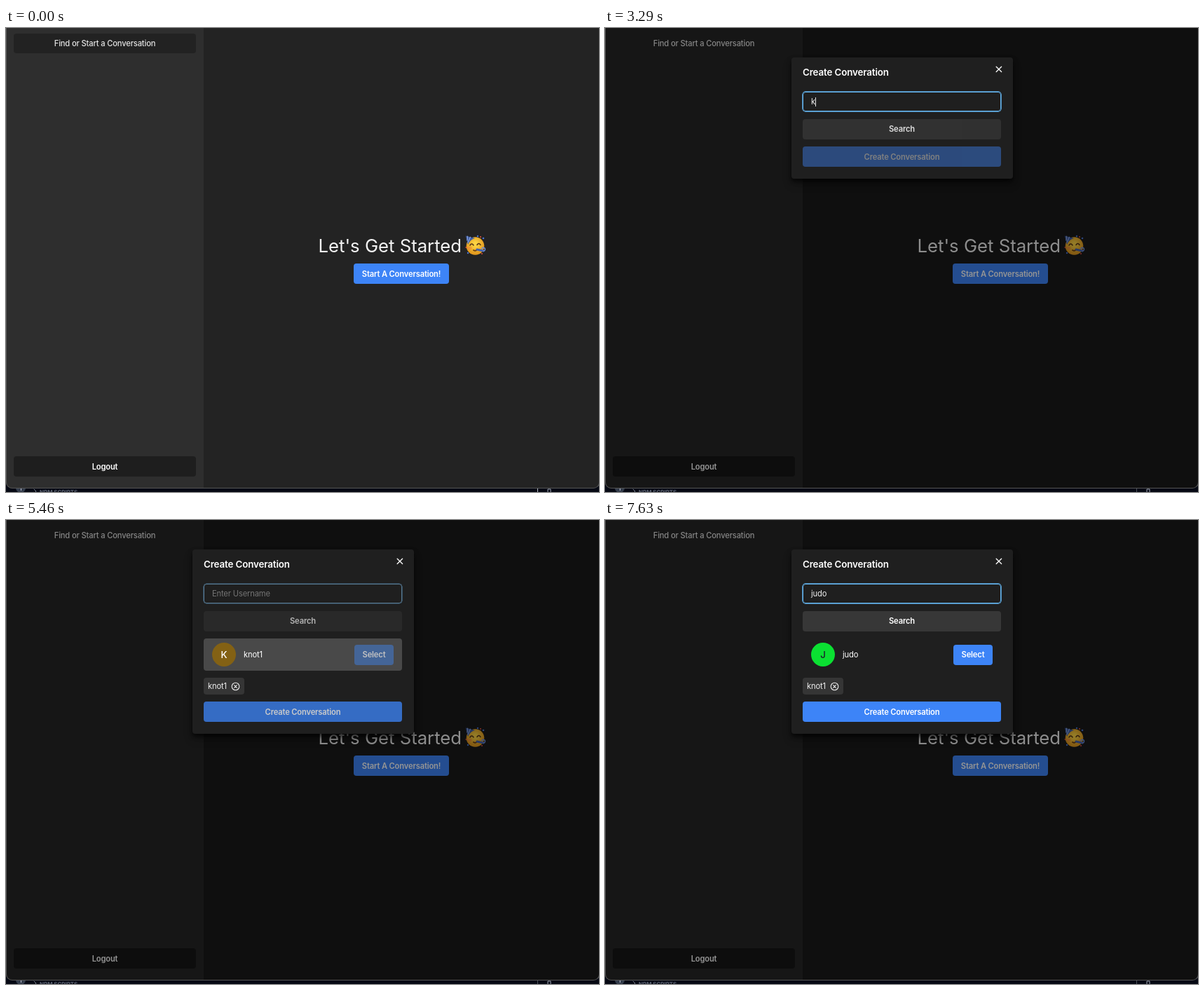
These frames come from a looping animation (846x662 px, 8 s). An HTML page:

```html
<!DOCTYPE html>
<html lang="en">
<head>
<meta charset="utf-8">
<title>Start a conversation</title>
<style>
  * { box-sizing: border-box; }
  html, body { margin: 0; width: 100%; height: 100%; overflow: hidden; background: #060914; }
  body { position: relative; font: 500 11.2px Inter, sans-serif; letter-spacing: -.17px;
         font-optical-sizing: none; color: #fff; white-space: pre; }
  .abs, .strip > * { position: absolute; }
  .button { display: flex; align-items: center; justify-content: center; height: 29px;
            border-radius: 4px; font-weight: 600; background: #3d84f7; }

  .strip { position: absolute; inset: 0; color: #596070; }
  .badge { left: 14px; top: 649px; width: 14px; height: 14px; border-radius: 50%; background: #343d4c;
           color: #ccd; font: 600 7px/18px Inter, sans-serif; text-align: center; }
  .scripts { left: 48px; top: 657px; font: 700 7.9px/10px Inter, sans-serif; letter-spacing: 0; }

  .window, .frame { position: absolute; inset: 0 0 5px; border-radius: 0 0 9px 9px; overflow: hidden; }
  .frame { right: -1px; border: solid #545454; border-width: 0 1px 1px; }
  #main { inset: 0; }
  #sidebar { left: 0; top: 0; bottom: 0; width: 282px; }
  #find { left: 11px; top: 8px; width: 260px; height: 28px; font-weight: 500; color: #e4e4e4; }
  #logout { left: 11px; top: 611px; width: 260px; }
  .heading { left: 445.5px; top: 296px; font: 400 25.7px/30px Inter, sans-serif; letter-spacing: 0; color: #f2f2f2; }
  .emoji { left: 654px; top: 294px; }
  #start { left: 496px; top: 336px; width: 136px; }
  #overlay { inset: 0; background: #000; }

  #modal { left: 266px; top: 42px; width: 315.5px; padding: 49px 16.5px 16.6px 16px; border-radius: 4px;
           background: #1f1f1f; display: flex; flex-direction: column; gap: 10.5px;
           box-shadow: 0 4px 6px #000a, 0 8px 14px #0003; }
  .title { left: 16px; top: 11px; font: 600 13.4px/21px Inter, sans-serif; letter-spacing: -.15px; }
  .close { left: 291px; top: 12px; }
  #input { height: 28.4px; padding-left: 11px; border: 1px solid; border-radius: 4px; display: flex;
           align-items: center; font-weight: 400; color: #eee; }
  #caret { width: 1px; height: 13px; margin-right: -1px; background: #e8e8e8; }
  #placeholder { color: #747474; }
  #row { height: 45.5px; padding: 0 12px; border-radius: 4px; display: flex; align-items: center;
         gap: 11px; font-weight: 400; }
  #avatar { width: 34px; height: 34px; border-radius: 50%; text-align: center;
            font: 500 13.2px/34px Inter, sans-serif; }
  #select { width: 56px; margin-left: auto; }
  #chip { align-self: flex-start; height: 23.5px; padding: 0 6px; border-radius: 4px; display: flex;
          align-items: center; gap: 6px; background: #353535; font-weight: 400; color: #eee; }
  svg { display: block; fill: none; stroke-linecap: round; }
</style>
</head>
<body>
<div class="strip">
  <div class="badge">1</div>
  <svg style="left:38px;top:657px" width="8" height="8" stroke="#737a8a"><path d="M2 1l3 3-3 3"/></svg>
  <div class="scripts">NPM SCRIPTS</div>
  <div id="divider" style="left:758px;top:656px;width:1px;height:6px;background:#b5bac6"></div>
  <svg style="left:771px;top:656px" width="8" height="8" stroke="#a0a6b4"><path d="M2 8V2H6V8"/></svg>
</div>

<div class="window">
  <div class="abs" id="main"></div>
  <div class="abs" id="sidebar"></div>
  <div class="abs button" id="find">Find or Start a Conversation</div>
  <div class="abs button" id="logout">Logout</div>
  <div class="abs heading">Let's Get Started</div>
  <svg class="abs emoji" width="31" height="31">
    <defs><radialGradient id="skin" cy=".4"><stop offset=".2" stop-color="#fcd443"/><stop offset="1" stop-color="#e39c20"/></radialGradient></defs>
    <circle cx="15.5" cy="17" r="12.8" fill="url(#skin)"/>
    <path d="M2 2.5L15 6Q8 8 5 15Z" fill="#3f5fa8"/>
    <path d="M4.5 3.2L4 9M8.5 4.3L5 12" stroke="#8fa7dc" stroke-width="1.2"/>
    <path d="M8 16q2.5-4 5 0M18 15.5q2.5-4 5 0" stroke="#5a3716" stroke-width="1.5"/>
    <ellipse cx="7.5" cy="20" rx="3" ry="2" fill="#f08a3c" opacity=".7"/>
    <path d="M13 23q3 2 5-1" stroke="#6b3f14" stroke-width="1.8"/>
    <path d="M18 22L27 24" stroke="#4664ad" stroke-width="3"/>
    <path d="M27 24a2.3 2.3 0 1 0-2-3" stroke="#6f8fd6" stroke-width="1.5"/>
    <g fill="#4b74d0"><circle cx="19" cy="3" r="1.2"/><circle cx="27" cy="6" r="1.3"/><circle cx="5" cy="27" r="1.2"/></g>
    <g fill="#d9503f"><circle cx="23" cy="4" r="1.1"/><circle cx="2.5" cy="19" r="1.1"/><circle cx="25" cy="28" r="1.1"/></g>
  </svg>
  <div class="abs button" id="start">Start A Conversation!</div>
  <div class="abs" id="overlay"></div>
  <div class="abs" id="modal">
    <div class="abs title">Create Converation</div>
    <svg class="abs close" width="10" height="10" stroke="#f4f4f4" stroke-width="1.4"><path d="M1.2 1.2l7.4 7.4M8.6 1.2L1.2 8.6"/></svg>
    <div id="input"><span id="value"></span><span id="caret"></span><span id="placeholder">Enter Username</span></div>
    <div class="button" id="search">Search</div>
    <div id="row"><div id="avatar"></div><span id="name"></span><div class="button" id="select">Select</div></div>
    <div id="chip">knot1<svg width="13" height="13" stroke="#eee" stroke-width="1.1"><circle cx="6.5" cy="6.5" r="5.3"/><path d="M4.7 4.7l3.6 3.6M8.3 4.7L4.7 8.3"/></svg></div>
    <div class="button" id="create">Create Conversation</div>
  </div>
</div>
<div class="frame"></div>

<script>
const LOOP = 8000;
const OPEN = 1320, RESULT = 3920, SELECTED = 5390, SEARCHING = 7280, RESULT_2 = 7420;
const BLUE = '#3d84f7', HOVER = '#4a5a6e';
const typed = [[0, ''], [3220, 'k'], [3360, 'kn'], [3570, 'kno'], [3710, 'knot'], [SELECTED, ''],
               [6580, 'j'], [6860, 'ju'], [6930, 'jud'], [7070, 'judo']];
const caretOn = [[2380, 2940], [3220, 4200], [4760, SELECTED], [5950, 6440], [6580, 7630]];

const el = Object.fromEntries([...document.querySelectorAll('[id]')].map(e => [e.id, e]));
const mix = (a, b, p) => `color-mix(in srgb, ${b} ${p * 100}%, ${a})`;
const show = (e, on, display = 'flex') => e.style.display = on ? display : 'none';

function draw(t) {
  // Eased 0..1 transition, and one that returns to 0.
  const ramp = (start, length = 200) => {
    const p = Math.min(1, Math.max(0, (t - start) / length));
    return 1 - (1 - p) ** 2;
  };
  const pulse = (on, off) => ramp(on) - ramp(off);
  const fade = (e, p) => e.style.opacity = .43 + .57 * p;
  const paint = (e, a, b, p) => e.style.background = mix(a, b, p);

  const open = ramp(OPEN);
  paint(el.main, '#232323', '#191919', open);
  paint(el.sidebar, '#2e2e2e', '#262626', open);
  paint(el.find, '#222222', '#262626', open);
  paint(el.logout, '#1e1e1e', '#171717', open);
  paint(el.start, BLUE, HOVER, pulse(1010, 1460));
  el.overlay.style.opacity = .42 * open;
  el.divider.style.opacity = t < 70 || t >= 700 && t < 1050 ? 1 : .4;

  show(el.modal, t >= OPEN);
  el.modal.style.opacity = open;
  el.modal.style.transform = open < 1 ? `scale(${.95 + .05 * open})` : 'none';

  const value = typed.findLast(([start]) => t >= start)[1];
  el.value.textContent = value;
  show(el.placeholder, !value, 'inline');
  show(el.caret, caretOn.some(([on, off]) => t >= on && t < off), 'block');
  const focus = pulse(2370, SELECTED) + ramp(6010);
  el.input.style.borderColor = mix('#505050', '#63b3ed', focus);
  el.input.style.boxShadow = `0 0 0 ${.7 * focus}px #63b3ed`;
  const searchable = pulse(3190, SELECTED) + ramp(6570);
  paint(el.search, '#2a2a2a', '#373737', searchable);
  fade(el.search, searchable);

  const second = t >= RESULT_2;
  show(el.row, t >= RESULT && t < SEARCHING || second);
  el.row.style.background = `rgb(255 255 255 / ${.19 * pulse(4750, 5930)})`;
  el.name.textContent = second ? 'judo' : 'knot1';
  el.avatar.textContent = second ? 'J' : 'K';
  el.avatar.style.background = second ? '#0be032' : '#836114';
  el.avatar.style.color = second ? '#1a202c' : '#fff';
  paint(el.select, BLUE, HOVER, pulse(5170, SELECTED));
  fade(el.select, second ? 1 : 1 - ramp(SELECTED));

  show(el.chip, t >= SELECTED);
  fade(el.create, ramp(SELECTED));
}

const begin = performance.now();
function tick() {
  draw((performance.now() - begin) % LOOP);
  requestAnimationFrame(tick);
}
tick();
</script>
</body>
</html>
```
